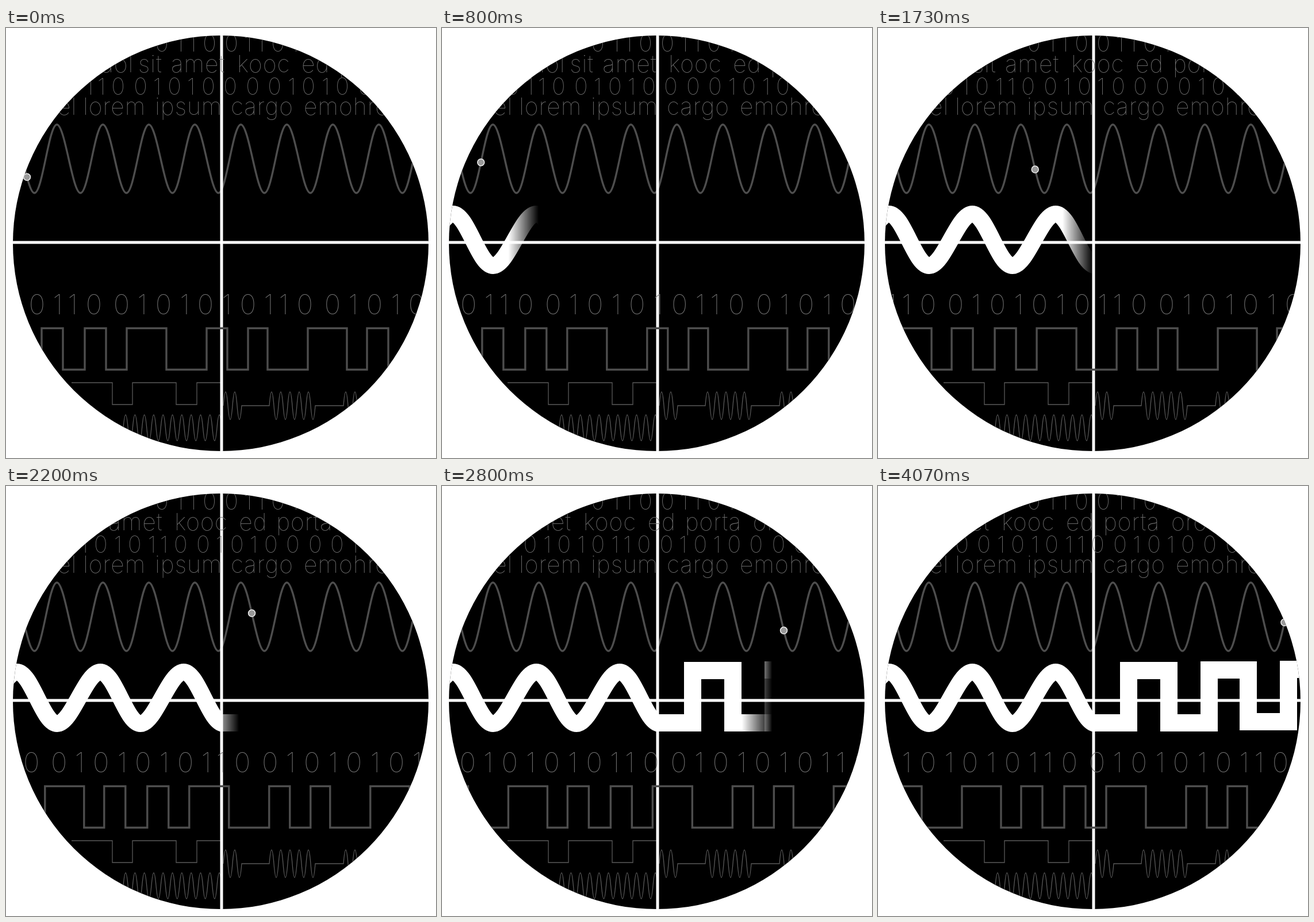
These frames come from a looping animation (748x748 px, 4.14 s). An HTML page without scripts:

```html
<!DOCTYPE html>
<html lang="en">
<head>
<meta charset="utf-8">
<title>Analog to digital</title>
<style>
  html, body { margin: 0; height: 100%; overflow: hidden; background: #fff; }
  svg { display: block; width: 100vw; height: 100vh; }
  text { font: 100 41px Inter, Lato, sans-serif; fill: #747474; letter-spacing: 1px; }
  .bits { font-size: 40px; letter-spacing: 0; text-anchor: middle; }
  .large { font-size: 48px; }
  .line { fill: none; stroke: #4d4d4d; stroke-width: 3.4; }
  .thin { stroke: #5a5a5a; stroke-width: 1.3; }
  .bold { fill: none; stroke: #fff; stroke-width: 29; }
  .pulse path { stroke-width: 30; mask: url(#wipeRight); }
</style>
</head>
<body>
<svg viewBox="0 0 748 748">
  <defs>
    <clipPath id="disc"><circle cx="373.5" cy="374.6" r="361.5"/></clipPath>

    <linearGradient id="fade">
      <stop offset=".934" stop-color="#fff"/>
      <stop offset="1" stop-color="#fff" stop-opacity="0"/>
    </linearGradient>
    <mask id="wipeLeft" maskUnits="userSpaceOnUse" style="mask-type:alpha" x="0" y="0" width="375" height="748">
      <rect x="-809" width="800" height="748" fill="url(#fade)">
        <animate attributeName="x" dur="4.14s" repeatCount="indefinite"
          values="-809;-375;-375" keyTimes="0;.474;1"/>
      </rect>
    </mask>
    <mask id="wipeRight" maskUnits="userSpaceOnUse" style="mask-type:alpha" x="375" y="0" width="373" height="748">
      <rect x="-428" width="800" height="748" fill="url(#fade)">
        <animate attributeName="x" dur="4.14s" repeatCount="indefinite"
          values="-428;-428;0;0" keyTimes="0;.503;.87;1"/>
      </rect>
    </mask>

    <text id="byte" class="bits large" x="0 48 84 121 158 194 231 268 304 330">0010101011</text>
  </defs>

  <g clip-path="url(#disc)">
    <rect width="748" height="748"/>

    <!-- still waves -->
    <path id="sine" class="line" d="M8.5 168c14 0 27 119 41 119s25-119 39-119 27 119 41 119 25-119 39-119 27 119 41 119 25-119 39-119 27 119 41 119 25-119 39-119 27 119 41 119 25-119 39-119 27 119 41 119 25-119 39-119 27 119 41 119 25-119 39-119 27 119 41 119 25-119 39-119 27 119 41 119 25-119 39-119"/>
    <path class="line thin" d="M114 617h71v38h35v-38h76v38h36v-38h41"/>
    <path class="line thin" d="M204 695.5q4.07-45 8.15 0t8.15 0 8.15 0 8.15 0 8.15 0 8.15 0 8.15 0 8.15 0 8.15 0 8.15 0 8.15 0 8.15 0 8.15 0 8.15 0 8.15 0 8.15 0 8.15 0 8.15 0 8.15 0 8.15 0 8.15 0"/>
    <path class="line thin" d="M378 657q4-48 8 0t8 0 8 0 8 0H458q4-48 8 0t8 0 8 0 8 0 8 0 8 0 8 0 8 0 8 0 8 0H587q4-48 8 0t8 0 8 0 8 0"/>

    <!-- crosshair -->
    <path fill="#fff" d="M372.5 0h5v748h-5zM0 370.5h748v5H0z"/>

    <!-- still text -->
    <text class="bits" y="41" x="271 302 324 354 392 421 443 473 502">011001101</text>
    <text y="151"><tspan x="89">el</tspan><tspan x="134">lorem</tspan><tspan x="259">ipsum</tspan><tspan x="391">cargo</tspan><tspan x="518">emohro</tspan></text>

    <!-- drifting left -->
    <g>
      <animateTransform attributeName="transform" type="translate" dur="4.14s" repeatCount="indefinite"
        calcMode="spline" values="0;-93.5;-187;-187" keyTimes="0;.4915;.983;1"
        keySplines=".35 0 .51 0;.49 1 .65 1;0 0 1 1"/>
      <text y="77"><tspan x="163">dol</tspan><tspan x="230">sit</tspan><tspan x="287">amet</tspan><tspan x="402">kooc</tspan><tspan x="514">ed</tspan><tspan x="579">porta</tspan><tspan x="697">oro</tspan></text>
      <use href="#byte" x="-214" y="498"/>
      <use href="#byte" x="153" y="498"/>
      <use href="#byte" x="520" y="498"/>
      <use href="#byte" x="887" y="498"/>
    </g>

    <!-- drifting right -->
    <g>
      <animateTransform attributeName="transform" type="translate" dur="4.14s" repeatCount="indefinite"
        calcMode="spline" values="0;93.5;187;187" keyTimes="0;.4915;.983;1"
        keySplines=".35 0 .51 0;.49 1 .65 1;0 0 1 1"/>
      <text class="bits" y="116" x="-41 -3 27 56 86 115 145 166 195 234 263 293 322 352 390 429 467 497 526 556 585 624">0010101100101000010100</text>
      <path class="line" d="M-160 522.3h49v72h70v-72h68v72h35v-72h37v72h38v-72h37v72h36v-72h69v72h70v-72h36v72h36v-72h34v72h70v-72h68v72h35v-72h37v72h50"/>
    </g>

    <!-- bold signal -->
    <g mask="url(#wipeLeft)">
      <path class="bold" d="M-56 413.5c25 0 50-90 75-90s45 90 70 90 50-90 75-90 45 90 70 90 50-90 75-90 45 90 70 90"/>
    </g>
    <g class="pulse">
      <path class="bold" d="M372 412h79M491 412h99M629 410h99"/>
      <path class="bold" d="M421 321h100M561 320h98M699 319h49"/>
      <path class="bold" d="M436 306v121M506 306v121M576 305v122M644 305v120M714 304v121"/>
    </g>

    <circle r="6" fill="#999" stroke="#eee" stroke-width="1.5">
      <animateMotion dur="4.14s" repeatCount="indefinite" calcMode="spline"
        keyPoints=".042;.505;.968;.968" keyTimes="0;.4915;.983;1"
        keySplines=".35 0 .51 0;.49 1 .65 1;0 0 1 1"><mpath href="#sine"/></animateMotion>
    </circle>
  </g>
</svg>
</body>
</html>
```
